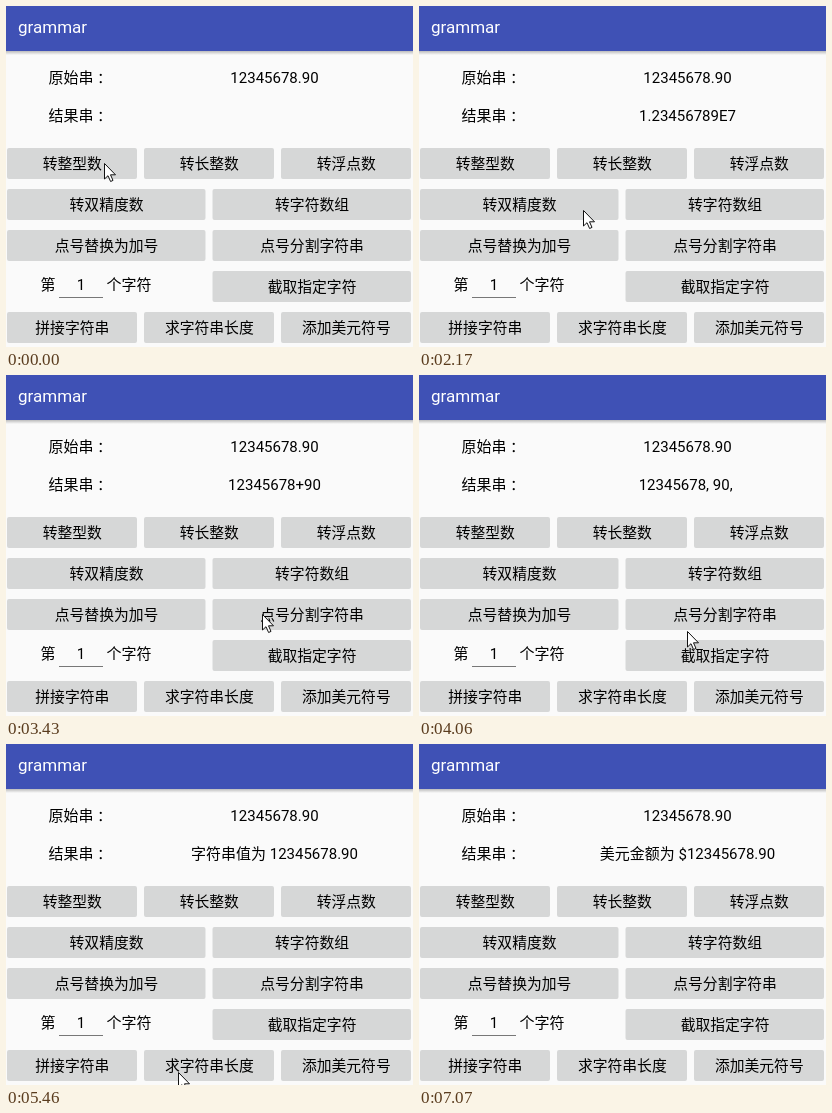
An HTML page that plays this animation: 407 px wide and 341 px high, repeating every 7.42 s.

```html
<!DOCTYPE html>
<html lang="zh-CN">
<head>
<meta charset="utf-8">
<style>
html, body { margin: 0; width: 100%; height: 100%; overflow: hidden; background: #fafafa; }
svg { display: block; width: 407px; height: 341px; }
text { font: 15px Roboto, "Noto Sans CJK SC", sans-serif; fill: #000; text-anchor: middle; }
.left { text-anchor: start; }
.title { font-size: 17px; fill: #fff; }
#buttons text { font-size: 14.8px; font-weight: 500; }
</style>
</head>
<body>
<svg viewBox="0 0 407 341">
  <defs>
    <linearGradient id="shade" x2="0" y2="1">
      <stop stop-color="#000" stop-opacity=".25"/>
      <stop offset="1" stop-color="#000" stop-opacity="0"/>
    </linearGradient>
  </defs>
  <rect width="407" height="341" fill="#fafafa"/>
  <rect y="45" width="407" height="4" fill="url(#shade)"/>
  <rect width="407" height="45" fill="#3f51b5"/>
  <text class="left title" x="12" y="27">grammar</text>
  <text class="left" x="42.5" y="77">原始串</text>
  <text class="left" x="91" y="77">：</text>
  <text class="left" x="42.5" y="115">结果串</text>
  <text class="left" x="91" y="115">：</text>
  <text x="268.5" y="77">12345678.90</text>
  <text id="result" x="268.5" y="115"></text>
  <text class="left" x="34.5" y="284">第</text>
  <text x="75" y="284">1</text>
  <text class="left" x="100.5" y="284">个字符</text>
  <path d="M53 291.5H97" stroke="#777"/>
  <g id="buttons"></g>
  <path id="cursor" d="M.5 .5V16L4 12.7L6.6 18.5L9 17.4L6.5 11.8H11.5Z" fill="#fff" stroke="#111"/>
</svg>
<script>
const LOOP = 7420, TICK = 70, GAP = 7;
const byId = id => document.getElementById(id);

function add(parent, tag, attrs, text = '') {
  const node = document.createElementNS('http://www.w3.org/2000/svg', tag);
  for (const name in attrs) node.setAttribute(name, attrs[name]);
  node.textContent = text;
  return parent.appendChild(node);
}

// Each row shares the width equally; an empty label leaves its cell free.
const rows = [
  ['转整型数', '转长整数', '转浮点数'],
  ['转双精度数', '转字符数组'],
  ['点号替换为加号', '点号分割字符串'],
  ['', '截取指定字符'],
  ['拼接字符串', '求字符串长度', '添加美元符号']
];
const buttons = {};
rows.forEach((labels, row) => labels.forEach((label, column) => {
  if (!label) return;
  const pitch = (404 + GAP) / labels.length;
  const x = 1 + column * pitch, y = 142 + 41 * row, width = pitch - GAP;
  buttons[label] = add(byId('buttons'), 'rect', { x, y, width, height: 31, rx: 2 });
  add(byId('buttons'), 'text', { x: x + width / 2 + .3, y: y + 21 }, label);
}));

// At each step a button darkens for one tick, then the result appears
// and the cursor glides to its next resting place.
const steps = [
  { at: 0, until: 0, to: [98, 157], result: '' },
  { at: 560, until: 910, to: [190, 157], press: '转整型数', result: '12345678' },
  { at: 1050, until: 1190, to: [330, 153], press: '转长整数', result: '12345678' },
  { at: 1470, until: 2030, to: [164, 204], press: '转浮点数', result: '1.2345679E7' },
  { at: 2100, until: 2450, to: [305, 195], result: '1.23456789E7' },
  { at: 2660, until: 3080, to: [148, 239], press: '转字符数组', result: '1,2,3,4,5,6,7,8,.,9,0,' },
  { at: 3220, until: 3640, to: [317, 239], press: '点号替换为加号', result: '12345678+90' },
  { at: 3850, until: 4410, to: [217, 274], press: '点号分割字符串', result: '12345678, 90,\u00a0' },
  { at: 4480, until: 5040, to: [73, 322], result: '2' },
  { at: 5180, until: 5670, to: [205, 330], press: '拼接字符串', result: '字符串值为 12345678.90' },
  { at: 5880, until: 6300, to: [335, 318], press: '求字符串长度', result: '字符串长度为 11' },
  { at: 6650, until: 6790, to: [335, 318], press: '添加美元符号', result: '美元金额为 $12345678.90' },
  { at: 6790, until: 7070, to: [345, 342], result: '美元金额为 $12345678.90' }
];

const easeOut = part => 1 - (1 - part) ** 2;

function draw(now) {
  const time = Math.floor(now % LOOP / TICK) * TICK;
  const index = steps.findLastIndex(step => step.at <= time);
  const step = steps[index], previous = steps[Math.max(0, index - 1)];
  const pressing = time < step.at + TICK;

  for (const label in buttons) {
    buttons[label].setAttribute('fill', pressing && label === step.press ? '#c2c3c3' : '#d6d7d7');
  }
  byId('result').textContent = (pressing ? previous : step).result;

  const moveStart = step.at + TICK;
  const part = pressing ? 0 : Math.min(1, (time - moveStart) / (step.until - moveStart));
  const tip = previous.to.map((from, axis) => Math.round(from + (step.to[axis] - from) * easeOut(part)));
  byId('cursor').setAttribute('transform', `translate(${tip})`);
}

const start = performance.now();
function loop() {
  draw(performance.now() - start);
  requestAnimationFrame(loop);
}
loop();
</script>
</body>
</html>
```
